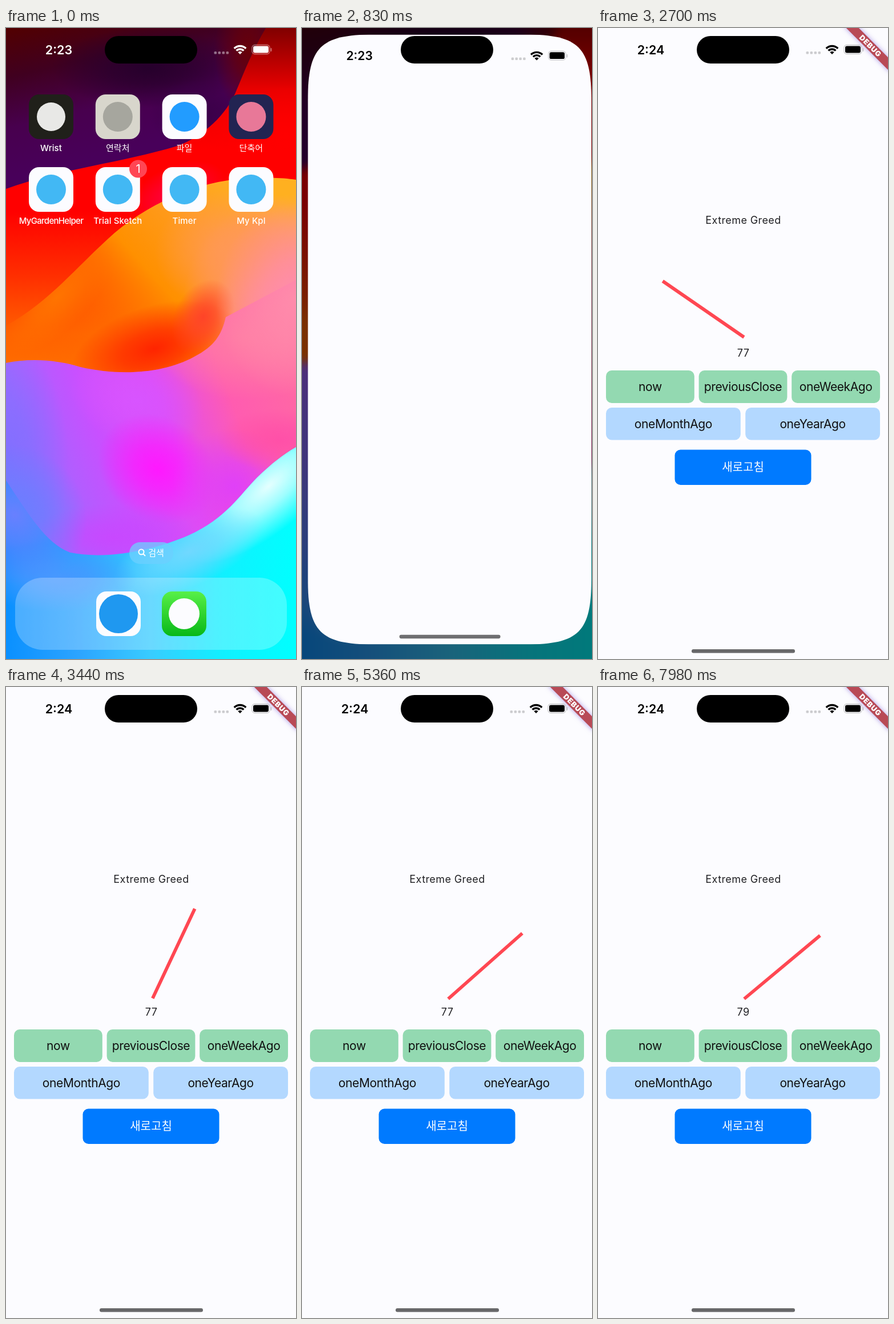
An HTML page with a canvas for the animation above (8000 ms loop, 508 px wide and 1102 px high).

```html
<!DOCTYPE html>
<html lang="ko">
<head>
<meta charset="utf-8">
<style>
html, body { margin: 0; width: 100%; height: 100%; overflow: hidden; background: #000; }
canvas { display: block; }
</style>
</head>
<body>
<canvas id="stage" width="508" height="1102"></canvas>
<script>
const W = 508, H = 1102, LOOP = 8000;
const OPEN = 500, OPENED = 1260, READY = 1330;
const PAPER = '#fcfcff';
const FONT = 'Inter, "Noto Sans CJK KR", "Noto Sans CJK", sans-serif';
const stage = document.getElementById('stage').getContext('2d');

const clamp = v => Math.max(0, Math.min(1, v));
const mix = (a, b, p) => a + (b - a) * p;
const spring = (t, start) => {
  const k = Math.max(0, t - start) * 0.0155;
  return 1 - (1 + k) * Math.exp(-k);
};

// cubic-bezier(.42, 0, .58, 1)
function easeInOut(t) {
  let lo = 0, hi = 1;
  for (let i = 0; i < 20; i++) {
    const u = (lo + hi) / 2;
    if (1.26 * u - 0.78 * u * u + 0.52 * u ** 3 < t) lo = u; else hi = u;
  }
  return lo * lo * (3 - 2 * lo);
}

function layer(draw) {
  const canvas = document.createElement('canvas');
  canvas.width = W;
  canvas.height = H;
  draw(canvas.getContext('2d'));
  return canvas;
}

function box(c, x, y, w, h, r, color) {
  c.fillStyle = color;
  c.beginPath();
  c.roundRect(x, y, w, h, r);
  c.fill();
}

function disc(c, x, y, r, color) {
  c.fillStyle = color;
  c.beginPath();
  c.arc(x, y, r, 0, 7);
  c.fill();
}

// Rectangle whose corners bend gradually; e is the length of the bend
function smoothRect(x, y, w, h, e) {
  const path = new Path2D(), k = e * 0.19, r = x + w, b = y + h;
  path.moveTo(x, y + e);
  path.bezierCurveTo(x, y + k, x + k, y, x + e, y);
  path.lineTo(r - e, y);
  path.bezierCurveTo(r - k, y, r, y + k, r, y + e);
  path.lineTo(r, b - e);
  path.bezierCurveTo(r, b - k, r - k, b, r - e, b);
  path.lineTo(x + e, b);
  path.bezierCurveTo(x + k, b, x, b - k, x, b - e);
  path.closePath();
  return path;
}

function text(c, str, x, y, size, color, weight = 400, spacing = 0) {
  c.font = `${weight} ${size}px ${FONT}`;
  c.letterSpacing = spacing + 'px';
  c.textAlign = 'center';
  c.textBaseline = 'alphabetic';
  c.fillStyle = color;
  c.fillText(str, x, y + size * 0.36);
}

function linear(c, x0, y0, x1, y1, ...colors) {
  const g = c.createLinearGradient(x0, y0, x1, y1);
  colors.forEach((color, i) => g.addColorStop(i / (colors.length - 1), color));
  return g;
}

// Soft elliptical spot of light
function glow(c, x, y, rx, ry, color, angle = 0) {
  c.save();
  c.translate(x, y);
  c.rotate(angle);
  c.scale(rx, ry);
  const g = c.createRadialGradient(0, 0, 0, 0, 0, 1);
  g.addColorStop(0, color);
  g.addColorStop(0.4, color + 'b0');
  g.addColorStop(1, color + '00');
  c.fillStyle = g;
  c.fillRect(-1, -1, 2, 2);
  c.restore();
}

function wave(c, path, fill, ...glows) {
  c.save();
  c.clip(new Path2D(path));
  c.fillStyle = fill;
  c.fillRect(0, 0, W, H);
  glows.forEach(g => glow(c, ...g));
  c.restore();
}

const wallpaper = layer(c => {
  wave(c, 'M0 0H508V1102H0Z', linear(c, 0, 0, 0, 640, '#800000', '#e80000', '#ff0000', '#ff0000', '#ff2c00', '#ff6000', '#ff7800'),
    [490, 190, 150, 90, '#ff0000'], [300, 290, 90, 50, '#ff0040', -0.4]);
  wave(c, 'M0 0H455C432 38 418 75 404 108C388 150 345 190 300 206C200 236 100 245 0 281Z',
    linear(c, 0, 0, 60, 250, '#520000', '#400020', '#48004e', '#48005a'),
    [250, 70, 170, 70, '#26002c'], [425, 40, 60, 110, '#680008'], [340, 150, 90, 60, '#3a0048']);
  wave(c, 'M0 620V520C80 475 120 420 190 358C260 300 350 262 440 262C470 261 490 262 508 265V760H0Z',
    linear(c, 90, 590, 430, 280, '#ff6a0000', '#ff780080', '#ff9000', '#ff9c20', '#ffb020'),
    [500, 480, 190, 190, '#ff8cab'], [410, 390, 150, 110, '#ff9858'], [260, 560, 150, 75, '#ff2400', -0.3],
    [345, 505, 50, 70, '#ff4428', 0.5], [90, 470, 130, 55, '#ff7400', -0.8]);
  wave(c, 'M0 585C45 576 90 580 130 592C200 608 275 604 330 574C365 556 378 536 385 505L508 440V1102H0Z',
    linear(c, 60, 780, 508, 610, '#a068ff', '#c850ff', '#e04cf4', '#ff5cb0', '#ff68a4'),
    [420, 540, 170, 110, '#ff7ca4'], [230, 650, 120, 80, '#d854ff', 0.3], [265, 770, 110, 90, '#ff18ff', 0.6],
    [400, 800, 110, 100, '#e040f8'], [480, 720, 110, 55, '#ff50a8'], [0, 760, 110, 220, '#8070ff'], [190, 890, 150, 60, '#c848ff']);
  glow(c, 508, 475, 140, 170, '#ff8cab');
  wave(c, 'M0 790C40 850 70 900 112 916C180 930 265 910 320 886C385 857 410 815 440 785C465 761 485 745 508 732V1102H0Z',
    linear(c, 0, 1000, 508, 1000, '#0a90ff', '#2ca4ff', '#38ccff', '#10f0ff', '#00ffff'),
    [460, 800, 190, 75, '#e4ffff', -0.7], [320, 915, 140, 60, '#70d8ff', -0.4], [90, 960, 140, 60, '#4898ff']);
  glow(c, 15, 850, 130, 120, '#6880ff', 0.6);
});

const icons = [
  ['Wrist', '#20201a', '#e8e8e6', 25],
  ['연락처', '#d8d6cc', '#a6a69e', 26],
  ['파일', '#fcfcff', '#229cff', 26],
  ['단축어', '#222452', '#e87898', 26],
  ['MyGardenHelper', PAPER, '#42b8f4', 26],
  ['Trial Sketch', PAPER, '#42b8f4', 26],
  ['Timer', PAPER, '#42b8f4', 26],
  ['My Kpl', PAPER, '#42b8f4', 26],
];

function tile(c, x, y, back, mark, r) {
  box(c, x, y, 78, 78, 18, back);
  disc(c, x + 39, y + 39, r, mark);
}

const home = layer(c => {
  icons.forEach(([label, back, mark, r], i) => {
    const x = 40 + (i % 4) * 116.8, y = i < 4 ? 116 : 243;
    tile(c, x, y, back, mark, r);
    const long = label.length > 12;
    text(c, label, x + 39, y + 94, 15, '#fff', 500, long ? -0.7 : 0.1);
  });
  disc(c, 231.5, 246, 15.5, '#ff4654');
  text(c, '1', 231.5, 246, 20, '#fff');

  box(c, 216, 898, 77, 38, 19, '#6cd0ffc0');
  c.strokeStyle = '#fff';
  c.lineWidth = 2;
  c.beginPath();
  c.arc(237, 915, 4.5, 0, 7);
  c.moveTo(240.5, 918.5);
  c.lineTo(244, 922);
  c.stroke();
  text(c, '검색', 263, 917, 15, '#fff', 500);

  box(c, 16, 960, 476, 126, 48, '#ffffff40');
  tile(c, 158, 984, PAPER, '#1f98f0', 34);
  tile(c, 273, 984, linear(c, 0, 984, 0, 1062, '#58f048', '#08b818'), PAPER, 27);
});

function statusBar(c, time, ink, faint) {
  text(c, time, 92.5, 38, 21.5, ink, 600);
  for (let i = 0; i < 4; i++) box(c, 364.5 + i * 7, 41, 4.6, 4.6, 1.5, faint);

  c.strokeStyle = ink;
  c.lineWidth = 3.4;
  for (const r of [9, 14.5]) {
    c.beginPath();
    c.arc(410, 46, r, -Math.PI * 0.75, -Math.PI * 0.25);
    c.stroke();
  }
  c.fillStyle = ink;
  c.beginPath();
  c.moveTo(410, 46);
  c.arc(410, 46, 5.2, -Math.PI * 0.75, -Math.PI * 0.25);
  c.fill();

  c.strokeStyle = faint;
  c.lineWidth = 1.3;
  c.beginPath();
  c.roundRect(431, 29.5, 31, 16, 5);
  c.stroke();
  box(c, 433, 31.5, 27, 12, 3, ink);
  box(c, 463.5, 35, 2, 6, 1, faint);
}

function debugBanner(c) {
  c.save();
  c.translate(W, 0);
  c.rotate(Math.PI / 4);
  c.shadowColor = '#7050d090';
  c.shadowBlur = 8;
  box(c, -56, 36.2, 112, 15.5, 0, '#b84a56');
  c.shadowColor = 'transparent';
  text(c, 'DEBUG', 0.4, 43.9, 12.8, '#fff', 900, 0.8);
  c.restore();
}

function button(c, label, x, y, w, h, color, ink = '#101010', size = 21, spacing = -0.4) {
  box(c, x, y, w, h, 10, color);
  text(c, label, x + w / 2, y + h / 2, size, ink, 400, spacing);
}

function needleValue(t) {
  if (t < 5360) return 77 * easeInOut(clamp((t - 2010) / 2000));
  if (t < 6150) return 77 * (1 - easeInOut((t - 5360) / 790));
  return 79 * easeInOut(clamp((t - 6150) / 2000));
}

function page(c, t) {
  text(c, 'Extreme Greed', 254.5, 336, 18, '#202024', 400, 0.4);
  c.save();
  c.translate(254.2, 542.4);
  c.rotate(Math.PI * (needleValue(t) / 100 - 1));
  c.fillStyle = '#ff4752';
  c.fillRect(0, 0, 173, 5.8);
  c.restore();
  text(c, t < 6150 ? '77' : '79', 254.5, 568, 18, '#202024', 400, 0.3);

  ['now', 'previousClose', 'oneWeekAgo'].forEach((s, i) => button(c, s, 14 + i * 162.6, 598, 154.8, 57, '#93d9b1'));
  ['oneMonthAgo', 'oneYearAgo'].forEach((s, i) => button(c, s, 14 + i * 244.2, 663, 235.8, 56.5, '#b3d8ff'));
  button(c, '새로고침', 134.5, 736.5, 239, 61.5, '#007aff', '#fff', 20, 0);
  debugBanner(c);
}

function backdrop(c, p) {
  const soften = p ? `blur(${9 * p}px) brightness(${1 - 0.53 * p})` : 'none';
  const put = (img, scale) => {
    c.save();
    c.filter = soften;
    c.translate(W / 2, H / 2);
    c.scale(scale, scale);
    c.drawImage(img, -W / 2, -H / 2);
    c.restore();
  };
  put(wallpaper, 1 + 0.1 * p);
  put(home, 1 - 0.043 * p);
  c.globalAlpha = 1 - 0.25 * p;
  statusBar(c, '2:23', '#fff', '#ffffff70');
  c.globalAlpha = 1;
}

// The launching app grows out of its icon; height lags a little behind width.
function appWindow(c, t) {
  const done = t >= OPENED;
  const p = done ? 1 : spring(t, 475), q = done ? 1 : spring(t, 500);
  const w = mix(78, W, p), h = mix(78, H, q);
  const x = mix(429, W / 2, p) - w / 2, y = mix(282, H / 2, p) - h / 2;
  const bend = mix(27, 115, Math.min(1, p * 1.4)) * (1 - clamp((t - 1000) / 260));
  const s = w / W, shown = clamp((t - OPEN) / 60);
  c.save();
  c.clip(smoothRect(x, y, w, h, bend));
  c.fillStyle = PAPER;
  c.fillRect(x, y, w, h);
  c.globalAlpha = 1 - shown;
  disc(c, x + w / 2, y + h / 2, w / 3, '#42b8f4');
  c.globalAlpha = shown;
  c.translate(x, y);
  c.scale(s, s);
  if (t >= READY) page(c, t);
  statusBar(c, t < READY ? '2:23' : '2:24', '#000', '#00000030');
  c.globalAlpha = p * p;
  box(c, 164, h / s - 17, 181, 6.5, 3.2, '#68686a');
  c.restore();
}

function render(t) {
  const c = stage;
  c.fillStyle = '#000';
  c.fillRect(0, 0, W, H);
  if (t < OPENED) backdrop(c, t < OPEN ? 0 : spring(t, 475));
  if (t >= OPEN) appWindow(c, t);
  box(c, 173, 14, 162, 48, 24, '#000');
}

const start = performance.now();
function tick() {
  render((performance.now() - start) % LOOP);
  requestAnimationFrame(tick);
}
tick();
</script>
</body>
</html>
```
